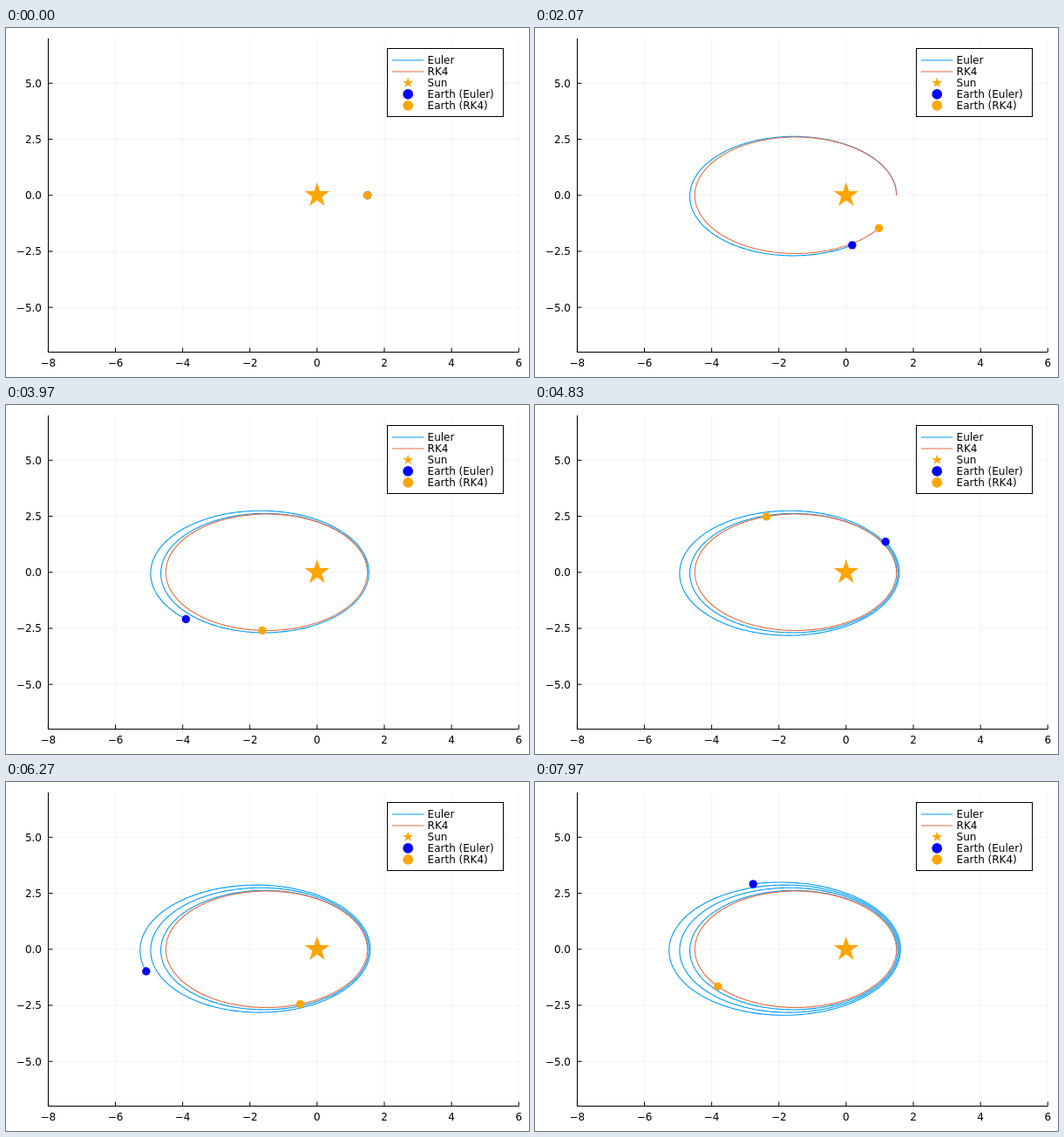
These frames come from a looping animation (600 px wide and 400 px high, 8000 ms). An HTML page:

```html
<!DOCTYPE html>
<html lang="en">
<head>
<meta charset="utf-8">
<title>Euler and RK4 orbits</title>
<style>
  html, body { margin: 0; width: 100%; height: 100%; overflow: hidden; background: #fff; }
  svg { display: block; width: 600px; height: 400px; }
  text { font: 12px "DejaVu Sans", sans-serif; fill: #000; }
  .grid { stroke: #000; stroke-opacity: .1; stroke-width: .5; }
  .axis { stroke: #000; fill: none; }
  .curve { fill: none; stroke-width: 1.1; stroke-linejoin: round; }
</style>
</head>
<body>
<svg id="stage" viewBox="0 0 600 400"></svg>
<script>
const EULER = '#009afa', RK4 = '#e36f47', BLUE = '#0000ff', ORANGE = '#ffa500';
const LOOP = 8000, FRAMES = 240, STEP = 0.01, STEPS_PER_FRAME = 50, SAMPLE = 10;
const SAMPLES_PER_FRAME = STEPS_PER_FRAME / SAMPLE;

const stage = document.getElementById('stage');
const px = x => 356.9 + 38.56 * x;
const py = y => 191.75 - 25.69 * y;

function add(tag, attrs, text) {
  const el = document.createElementNS('http://www.w3.org/2000/svg', tag);
  for (const name in attrs) el.setAttribute(name, attrs[name]);
  if (text) el.textContent = text;
  return stage.appendChild(el);
}
const line = (x1, y1, x2, y2, attrs) => add('line', { x1, y1, x2, y2, ...attrs });
const dot = (cx, cy, r, fill) => add('circle', { cx, cy, r, fill });
const curve = stroke => add('polyline', { class: 'curve', stroke });

function star(cx, cy, radius) {
  const points = Array.from({ length: 10 }, (_, i) => {
    const r = i % 2 ? radius * 0.382 : radius, a = i * Math.PI / 5;
    return [cx + r * Math.sin(a), cy - r * Math.cos(a)].map(v => v.toFixed(2));
  });
  add('polygon', { points: points.join(' '), fill: ORANGE });
}

function drawAxes() {
  const left = 48.5, right = 588.2, top = 11.9, bottom = 371.5;
  const xs = [-8, -6, -4, -2, 0, 2, 4, 6], ys = [-5, -2.5, 0, 2.5, 5];
  const label = s => String(s).replace('-', '\u2212');
  for (const x of xs) line(px(x), top, px(x), bottom, { class: 'grid' });
  for (const y of ys) line(left, py(y), right, py(y), { class: 'grid' });
  add('path', { class: 'axis', d: `M${left} ${top}V${bottom}H${right}` });
  for (const x of xs) {
    line(px(x), bottom, px(x), bottom - 5, { class: 'axis' });
    add('text', { x: px(x), y: 387.6, 'text-anchor': 'middle' }, label(x));
  }
  for (const y of ys) {
    line(left, py(y), left + 5, py(y), { class: 'axis' });
    add('text', { x: 41, y: py(y) + 4.4, 'text-anchor': 'end' }, label(y.toFixed(1)));
  }
}

function drawLegend() {
  const row = i => 37 + 12.96 * i;
  add('rect', { x: 437.5, y: 23.5, width: 133, height: 78, fill: '#fff', stroke: '#000' });
  [EULER, RK4].forEach((stroke, i) => line(443, row(i), 479.3, row(i), { stroke, 'stroke-width': 1.1 }));
  star(461.2, row(2), 6.4);
  dot(461.2, row(3), 5.9, BLUE);
  dot(461.2, row(4), 5.9, ORANGE);
  ['Euler', 'RK4', 'Sun', 'Earth (Euler)', 'Earth (RK4)'].forEach((name, i) =>
    add('text', { x: 483.6, y: row(i) + 4.3 }, name));
}

// State is [x, y, vx, vy] around a unit mass at the centre.
function slope([x, y, vx, vy]) {
  const r3 = Math.hypot(x, y) ** 3;
  return [vx, vy, -x / r3, -y / r3];
}
const advance = (s, k, h) => s.map((v, i) => v + h * k[i]);

const eulerStep = s => advance(s, slope(s), STEP);
function rk4Step(s) {
  const k1 = slope(s);
  const k2 = slope(advance(s, k1, STEP / 2));
  const k3 = slope(advance(s, k2, STEP / 2));
  const k4 = slope(advance(s, k3, STEP));
  return advance(s, k1.map((k, i) => (k + 2 * k2[i] + 2 * k3[i] + k4[i]) / 6), STEP);
}

function orbit(step) {
  const points = [];
  let s = [1.5, 0, 0, 1];
  for (let n = 0; n <= (FRAMES - 1) * STEPS_PER_FRAME; n++, s = step(s)) {
    if (n % SAMPLE === 0) points.push([px(s[0]).toFixed(2), py(s[1]).toFixed(2)]);
  }
  return points;
}

drawAxes();
const bodies = [
  { points: orbit(eulerStep), trail: curve(EULER) },
  { points: orbit(rk4Step), trail: curve(RK4) }
];
star(px(0), py(0), 15);
bodies[0].marker = dot(0, 0, 4.7, BLUE);
bodies[1].marker = dot(0, 0, 4.7, ORANGE);
drawLegend();

let shown = -1;
function show(time) {
  const frame = Math.min(FRAMES - 1, Math.floor((time % LOOP + 5) * FRAMES / LOOP));
  if (frame === shown) return;
  shown = frame;
  const last = frame * SAMPLES_PER_FRAME;
  for (const { points, trail, marker } of bodies) {
    trail.setAttribute('points', points.slice(0, last + 1).join(' '));
    marker.setAttribute('cx', points[last][0]);
    marker.setAttribute('cy', points[last][1]);
  }
}

const start = performance.now();
function tick() {
  show(performance.now() - start);
  requestAnimationFrame(tick);
}
tick();
</script>
</body>
</html>
```
